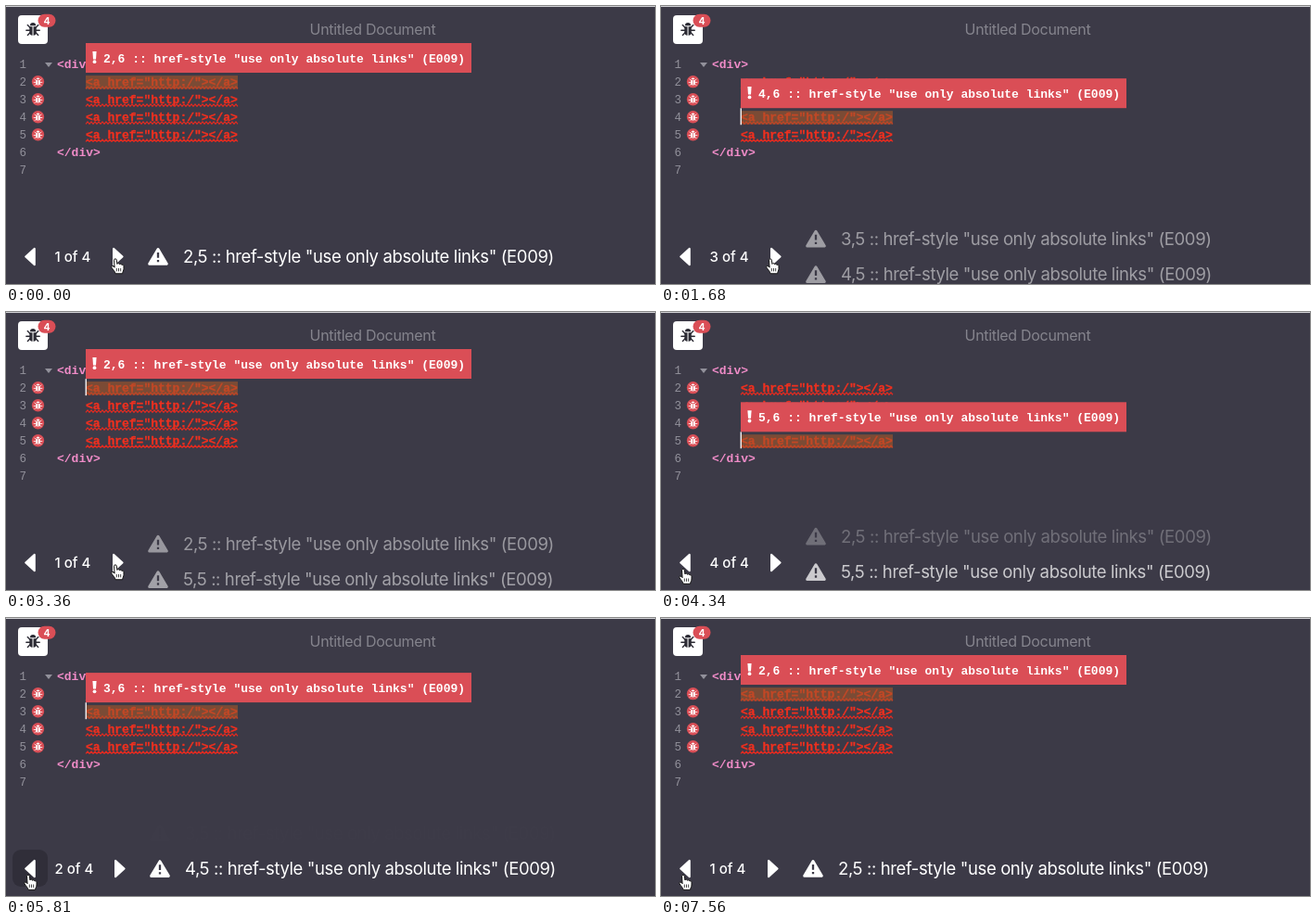
Write an HTML page that moves like this. It is 700 by 300 pixels and loops after 7.63 s.

```html
<!DOCTYPE html>
<html lang="en">
<head>
<meta charset="utf-8">
<title>Lint panel</title>
<style>
  html, body { margin: 0; width: 100%; height: 100%; overflow: hidden; background: #3c3a47; }
  svg { display: block; width: 100vw; height: 100vh; }
  text { white-space: pre; }
  .ui { font-family: Inter, Roboto, sans-serif; fill: #fff; }
  .code { font: bold 13px "Liberation Mono", monospace; }
  .num { font: 12.5px "Liberation Mono", monospace; fill: #92919b; }
  .msg { font-size: 18.55px; letter-spacing: -.4px; }
  .tag { fill: #f08cc8; }
  .bad { fill: #f0301f; stroke: #f0301f; stroke-width: .3; }
  .wave { fill: none; stroke: #e32a20; stroke-width: 1.2; }
</style>
</head>
<body>
<svg viewBox="0 0 700 300">
  <defs>
    <symbol id="bug" viewBox="0 0 16 16" overflow="visible">
      <path d="M5 4.2a3 3 0 0 1 6 0z"/>
      <path d="M4.4 5.2h3.1v9.2a3.4 3.4 0 0 1-3.1-3.4zM11.6 5.2H8.5v9.2a3.4 3.4 0 0 0 3.1-3.4z"/>
      <path d="M5 6.2 2.4 3.6M11 6.2l2.6-2.6M5 9.2H1M11 9.2h4M5 11.6l-2.5 2.6M11 11.6l2.5 2.6"
        fill="none" stroke="currentColor" stroke-width="1.3" stroke-linecap="round"/>
    </symbol>
  </defs>
  <rect width="700" height="300" fill="#3c3a47"/>
  <rect width="700" height="1" fill="#cfcfd3"/>
  <text class="ui" x="395.5" y="31" text-anchor="middle" font-size="16" letter-spacing="-.3"
    style="fill:#85848d">Untitled Document</text>

  <rect x="13" y="10" width="32" height="31" rx="4" fill="#fff"/>
  <use href="#bug" x="20.8" y="16.8" width="16.5" height="16.5" fill="#2b2a33" color="#2b2a33"/>
  <rect x="34.5" y="8.7" width="19" height="14" rx="7" fill="#da4e56"/>
  <text class="ui" x="44" y="19.6" text-anchor="middle" font-size="10.5" font-weight="700">4</text>

  <path d="M42 61h8l-4 5z" fill="#92919b"/>
  <g id="rows"></g>
  <rect id="mark" x="86" width="164" height="14.5" fill="#a5582a" opacity=".6"/>
  <rect id="caret" x="85.6" width="1.3" height="18" fill="#fff"/>

  <g id="tip">
    <rect x="86" width="416" height="32" fill="#da4e56"/>
    <path d="M93.4 8.9h4.2l-.6 8.5h-3z" fill="#fff"/>
    <circle cx="95.5" cy="20.2" r="1.9" fill="#fff"/>
    <text id="tipText" class="code" x="105" y="21.2" fill="#fff"></text>
  </g>

  <g id="msgs"></g>
  <rect id="press" y="250" width="38" height="40" rx="9" fill="#302e39"/>
  <g fill="#fff" stroke="#fff" stroke-width="2" stroke-linejoin="round">
    <path d="M30.8 261.8v17.4l-9.6-8.7z"/>
    <path id="next" d="M116 261.8v17.4l9.6-8.7z"/>
  </g>
  <text id="count" class="ui" x="52.5" y="276" font-size="15" font-weight="500"></text>
  <g id="hand" stroke="#111" stroke-linejoin="round">
    <path fill="#fff" d="M-1.5 1.2C-1.5-.6 1.3-.6 1.4 1.2L1.9 5.4C2.4 4.2 4.3 4.4 4.5 5.8
      C5.1 4.9 6.8 5.2 7 6.6C7.6 5.9 9 6.3 9 7.7V10.5C9 12.6 7.8 13.5 7.6 15.8H.1
      C-.3 13.6-2.5 11.7-3.9 9.4C-4.9 7.7-3.2 6.8-2 8.1L-.9 9.2Z"/>
    <path fill="none" stroke-width=".8" d="M1.3 10v3.4M3.5 10v3.4M5.7 10v3.4"/>
  </g>
</svg>
<script>
const LOOP = 7630, STEP = 70, SLIDE = 500, GAP = 38.6, BLINK = 530;
// [time, selected item, button]
const clicks = [
  [545, 1, 'next'], [1430, 2, 'next'], [2330, 3, 'next'], [3118, 0, 'next'],
  [4010, 3, 'prev'], [4903, 2, 'prev'], [5790, 1, 'prev'], [6880, 0, 'prev']
];
// [time, x, y] of the pointer
const track = [[0, 118, 273], [70, 118, 273], [210, 115.3, 274.5], [1150, 115.3, 274.5],
  [1400, 118, 273], [3430, 118, 273], [3850, 24, 277.5], [LOOP, 24, 277.5]];
const shift = [0, 2, 3, 3];

const $ = id => document.getElementById(id);
const clamp = v => Math.max(0, Math.min(1, v));
const ease = v => v * v * (3 - 2 * v);
const mix = (a, b, p) => a + (b - a) * p;
const set = (id, name, value) => $(id).setAttribute(name, value);
const label = (line, col) => `${line},${col} :: href-style "use only absolute links" (E009)`;
const rowY = line => 66.6 + 19.05 * (line - 1);

function buildRows() {
  const wave = 'l2 -2.4l2 2.4'.repeat(41);
  let out = '';
  for (let n = 1; n <= 7; n++) {
    const y = rowY(n);
    out += `<text class="num" x="14.5" y="${y}">${n}</text>`;
    if (n === 1 || n === 6)
      out += `<text class="code tag" x="55" y="${y}">${n === 1 ? '&lt;div&gt;' : '&lt;/div&gt;'}</text>`;
    else if (n < 6)
      out += `<circle cx="34.5" cy="${y - 4}" r="6.7" fill="#da4e56"/>
        <use href="#bug" x="29.5" y="${y - 9}" width="10" height="10" fill="#fff" color="#fff"/>
        <text class="code bad" x="86" y="${y}">&lt;a href="http:/"&gt;&lt;/a&gt;</text>
        <path class="wave" d="M86 ${y + 3.6}${wave}"/>`;
  }
  $('rows').innerHTML = out;
}

function buildMessages() {
  $('msgs').innerHTML = [0, 1, 2, 3].map(i => `<g>
    <path d="M164 262.5l9.3 15.7h-18.6z" fill="#fff" stroke="#fff" stroke-width="3" stroke-linejoin="round"/>
    <path d="M164 266v5.8M164 274v2.3" stroke="#3c3a47" stroke-width="2.3"/>
    <text class="ui msg" x="191" y="277">${label(i + 2, 5)}</text></g>`).join('');
}

function pointer(t) {
  const k = track.findIndex(p => p[0] > t);
  const a = track[k - 1], b = track[k];
  const p = ease((t - a[0]) / (b[0] - a[0]));
  return [mix(a[1], b[1], p), mix(a[2], b[2], p)];
}

function draw(t) {
  const k = clicks.findLastIndex(c => c[0] <= t);
  const now = k < 0 ? 0 : clicks[k][1];
  const was = k < 1 ? 0 : clicks[k - 1][1];
  const since = k < 0 ? BLINK : t - clicks[k][0];
  const p = ease(clamp(since / SLIDE));
  const dir = Math.sign(now - was);
  const dx = shift[now], y = rowY(now + 2);

  [...$('msgs').children].forEach((g, i) => {
    const dy = i === now ? dir * GAP * (1 - p) : -dir * GAP * p;
    const alpha = i === now ? (dir ? p : 1) : i === was ? 1 - p : 0;
    g.setAttribute('transform', `translate(${dx} ${dy})`);
    g.setAttribute('opacity', alpha);
  });

  set('tip', 'transform', `translate(0 ${40 + 19.1 * now})`);
  $('tipText').textContent = label(now + 2, 6);
  $('count').textContent = `${now + 1} of 4`;
  set('next', 'transform', `translate(${dx} 0)`);
  set('mark', 'y', y - 10.6);
  set('caret', 'y', y - 13.5);
  set('caret', 'opacity', Math.floor(since / BLINK) % 2 ? 0 : 1);

  const hit = clicks.find(c => t >= c[0] - 110 && t < c[0] + 200);
  set('press', 'opacity', hit ? clamp((hit[0] + 200 - t) / 120) : 0);
  set('press', 'x', hit && hit[2] === 'prev' ? 7 : 101 + dx);

  const [px, py] = pointer(t);
  set('hand', 'transform', `translate(${px} ${py})`);
}

function tick() {
  const t = performance.now() % LOOP;
  draw(Math.floor(t / STEP) * STEP);
  requestAnimationFrame(tick);
}

buildRows();
buildMessages();
tick();
</script>
</body>
</html>
```
